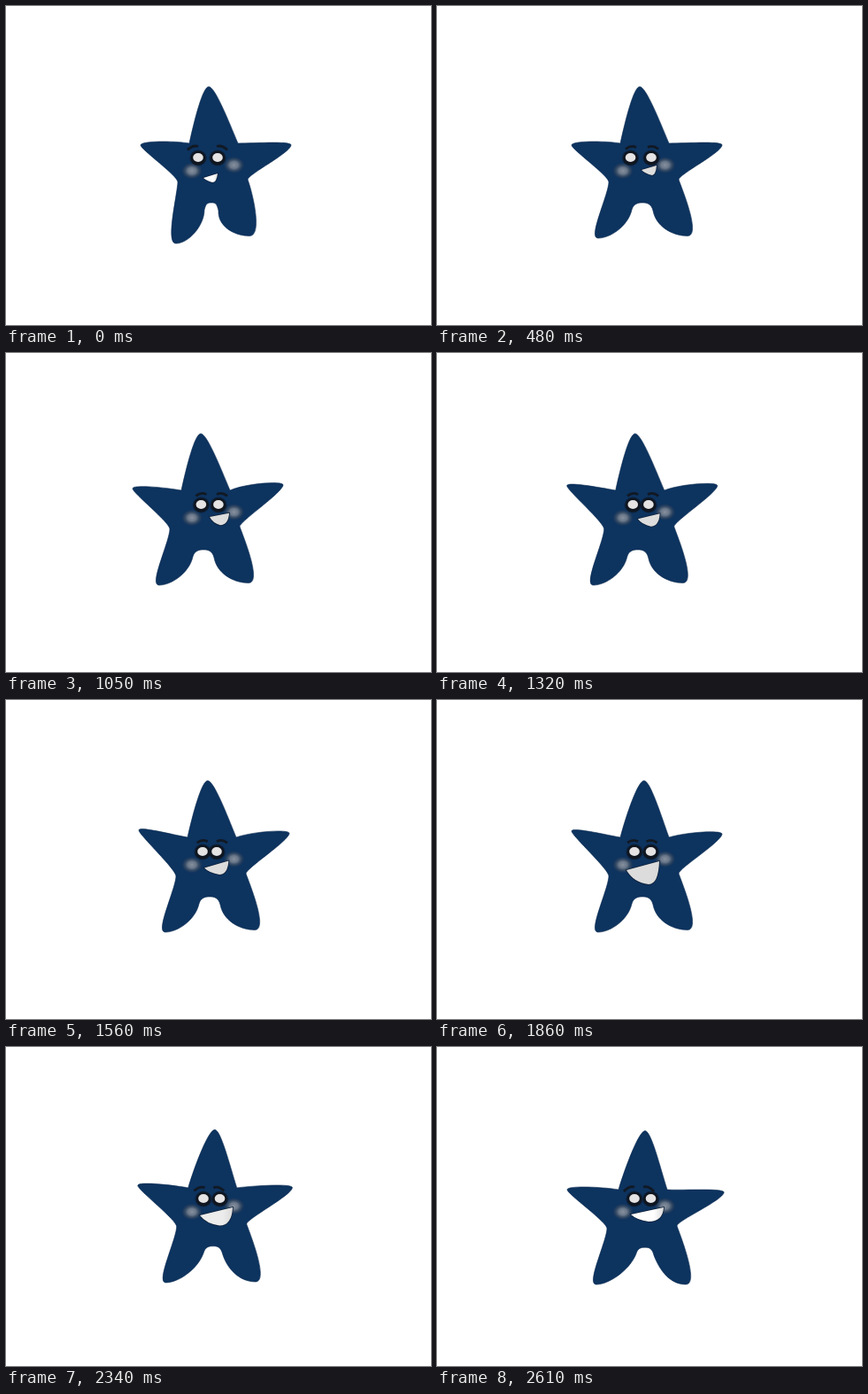
An HTML page with a canvas for the animation above (2.67 s loop, 480 px wide and 360 px high).

```html
<!DOCTYPE html>
<html lang="en">
<head>
<meta charset="utf-8">
<title>Dancing star</title>
<style>
html, body { margin: 0; width: 100%; height: 100%; overflow: hidden; background: #fff; }
canvas { display: block; }
</style>
</head>
<body>
<canvas width="480" height="360"></canvas>
<script>
const ctx = document.querySelector('canvas').getContext('2d');
const LOOP = 2670, STEP = 30, LAST = 2610;

// Linear motion through [time, value] keys, held before the first and after the last.
const track = (...keys) => t => {
  const i = keys.findIndex(key => key[0] > t);
  if (i <= 0) return keys.at(i)[1];
  const [t0, a] = keys[i - 1], [t1, b] = keys[i];
  return a + (b - a) * (t - t0) / (t1 - t0);
};
const path = (xTrack, yTrack) => t => [xTrack(t), yTrack(t)];

// Body: the feet open, the torso sways and sinks, the head tilts, the arms lift.
const stance = track([0, 0], [480, 1]);
const sway = track([480, 0], [1050, -9], [1560, -2], [1860, 0], [2610, -2]);
const sink = track([1860, 0], [2100, 2], [2610, 6]);
const headTilt = track([1500, 0], [2100, 8]);
const liftLeft = track([480, 0], [1050, 4], [1560, 10], [1860, 9], [2610, 2]);
const liftRight = track([480, 0], [1050, 8], [2100, 5], [2610, -1]);

// Face
const eyeLeft = track([0, 217], [1860, 223]);
const eyeRight = track([0, 239], [480, 242], [1560, 238], [1860, 241.5]);
const browLeft = track([0, 211], [480, 219], [1700, 222], [2610, 217]);
const browRight = track([1560, 244], [2610, 239]);
const browTilt = track([0, 2], [480, 1], [1860, .7], [2610, 2.5]);
const mouthLeft = path(
  track([0, 223], [480, 231], [1050, 230], [1560, 224], [1860, 214], [2100, 219]),
  track([0, 194], [480, 185], [1050, 185], [1860, 192], [2610, 189]));
const mouthRight = path(
  track([0, 239], [480, 248], [1050, 252], [1860, 251], [2100, 256]),
  track([0, 189], [480, 180], [1860, 182], [2100, 181]));
const mouthBottom = path(
  track([0, 233], [480, 243], [1560, 241], [1860, 239], [2100, 243], [2610, 239]),
  track([0, 199], [480, 191], [1560, 197], [1860, 208], [2100, 205.5], [2610, 197]));
const mouthShade = track([0, 255], [480, 222], [2100, 220], [2610, 255]);

function ellipse(x, y, rx, ry, fill) {
  ctx.beginPath();
  ctx.ellipse(x, y, rx, ry, 0, 0, 2 * Math.PI);
  ctx.fillStyle = fill;
  ctx.fill();
}

function drawBody(t) {
  const dx = sway(t), dy = sink(t), open = stance(t);
  const apexX = 229 + dx + headTilt(t), apexY = 91 + .6 * dy;
  const shoulderL = 207 + dx, shoulderR = 262 + dx, shoulderY = 155 + dy;
  const handLX = 152 + dx - .5 * dy, handLY = 157 + dy - liftLeft(t);
  const handRX = 322 + dx + .7 * dy, handRY = 157 + dy - liftRight(t);
  const waistL = 194 + dx, waistLY = 199 + dy, waistR = 273 + dx, waistRY = 196 + dy;
  const footLX = 192 + dx - 10 * open, footLY = 268 + dy - 6 * open;
  const footRX = 275 + dx + 8 * open, footRY = 259.5 + 1.4 * dy;
  const crotchX = 232 + dx + .8 * dy, crotchY = 222 + .7 * dy;
  const half = 8 + 4 * open - .3 * dy, splay = 4 * open + .6 * dy;
  const innerL = crotchX - half, innerR = crotchX + half;
  const curve = (...p) => ctx.bezierCurveTo(...p);

  ctx.beginPath();
  ctx.moveTo(shoulderL, shoulderY);
  curve(shoulderL + .25 * (apexX - shoulderL), shoulderY - 25, apexX - 7, apexY, apexX, apexY);
  curve(apexX + 7, apexY, shoulderR - .33 * (shoulderR - apexX), shoulderY - 26, shoulderR, shoulderY);
  curve(shoulderR + 18, handRY - 2, handRX, handRY - 5, handRX, handRY);
  curve(handRX - 1, handRY + 9, waistR, waistRY - 6, waistR, waistRY);
  curve(waistR + 6, waistRY + 16, footRX + 15, footRY, footRX, footRY);
  curve(footRX - 18, footRY, innerR + splay - 1, crotchY + 26, innerR, crotchY + 9);
  curve(innerR - 2, crotchY + 1, crotchX + 5, crotchY, crotchX, crotchY);
  curve(crotchX - 5, crotchY, innerL + 2, crotchY + 1, innerL, crotchY + 8);
  curve(innerL - splay, crotchY + 26, footLX + 14, footLY, footLX, footLY);
  curve(footLX - 12, footLY, waistL - 1, waistLY + 16, waistL, waistLY);
  curve(waistL + 1, waistLY - 7, handLX, handLY + 5, handLX, handLY);
  curve(handLX, handLY - 5, shoulderL - 17, shoulderY - 3, shoulderL, shoulderY);
  ctx.fillStyle = '#0d335f';
  ctx.fill();
  ctx.strokeStyle = '#0b2b50';
  ctx.lineWidth = .6;
  ctx.stroke();
}

function drawCheek(x, y) {
  const glow = ctx.createRadialGradient(0, 0, 0, 0, 0, 12);
  glow.addColorStop(0, 'rgba(148,154,164,.9)');
  glow.addColorStop(.4, 'rgba(128,136,148,.8)');
  glow.addColorStop(.65, 'rgba(82,92,106,.6)');
  glow.addColorStop(1, 'rgba(50,60,76,0)');
  ctx.save();
  ctx.translate(x, y);
  ctx.scale(1, .8);
  ellipse(0, 0, 12, 12, glow);
  ctx.restore();
}

function drawEye(x) {
  ellipse(x, 171.5, 9.6, 9, 'rgba(14,20,30,.5)');
  ellipse(x, 171.5, 8.5, 8, '#0f1620');
  ellipse(x, 171, 5.8, 5, '#e5e3e3');
}

function drawBrow(x, tilt) {
  ctx.beginPath();
  ctx.moveTo(x - 6, 160.5 + tilt);
  ctx.quadraticCurveTo(x, 156.5, x + 6, 160.5 - tilt);
  ctx.strokeStyle = '#111923';
  ctx.lineWidth = 2.8;
  ctx.stroke();
}

function drawMouth([lx, ly], [rx, ry], [bx, by], shade) {
  const fill = ctx.createLinearGradient(lx, 0, rx, 0);
  const main = `rgb(${shade},${shade},${shade})`;
  fill.addColorStop(0, main);
  fill.addColorStop(.7, main);
  fill.addColorStop(1, '#dadada');
  ctx.beginPath();
  ctx.moveTo(lx, ly);
  ctx.lineTo(rx, ry);
  ctx.quadraticCurveTo(rx - 1, by, bx, by);
  ctx.quadraticCurveTo(lx + (bx - lx) * .32, by - 2, lx, ly);
  ctx.closePath();
  ctx.strokeStyle = '#0d2038';
  ctx.lineWidth = 1.6;
  ctx.stroke();
  ctx.fillStyle = fill;
  ctx.fill();
}

function drawFace(t) {
  drawCheek(210, 186);
  drawCheek(257.5, 179.5);
  drawEye(eyeLeft(t));
  drawEye(eyeRight(t));
  drawBrow(browLeft(t), browTilt(t));
  drawBrow(browRight(t), -browTilt(t));
  drawMouth(mouthLeft(t), mouthRight(t), mouthBottom(t), mouthShade(t));
}

function draw() {
  const t = Math.min(LAST, Math.floor(performance.now() % LOOP / STEP) * STEP);
  ctx.fillStyle = '#fff';
  ctx.fillRect(0, 0, 480, 360);
  drawBody(t);
  drawFace(t);
  requestAnimationFrame(draw);
}
draw();
</script>
</body>
</html>
```
